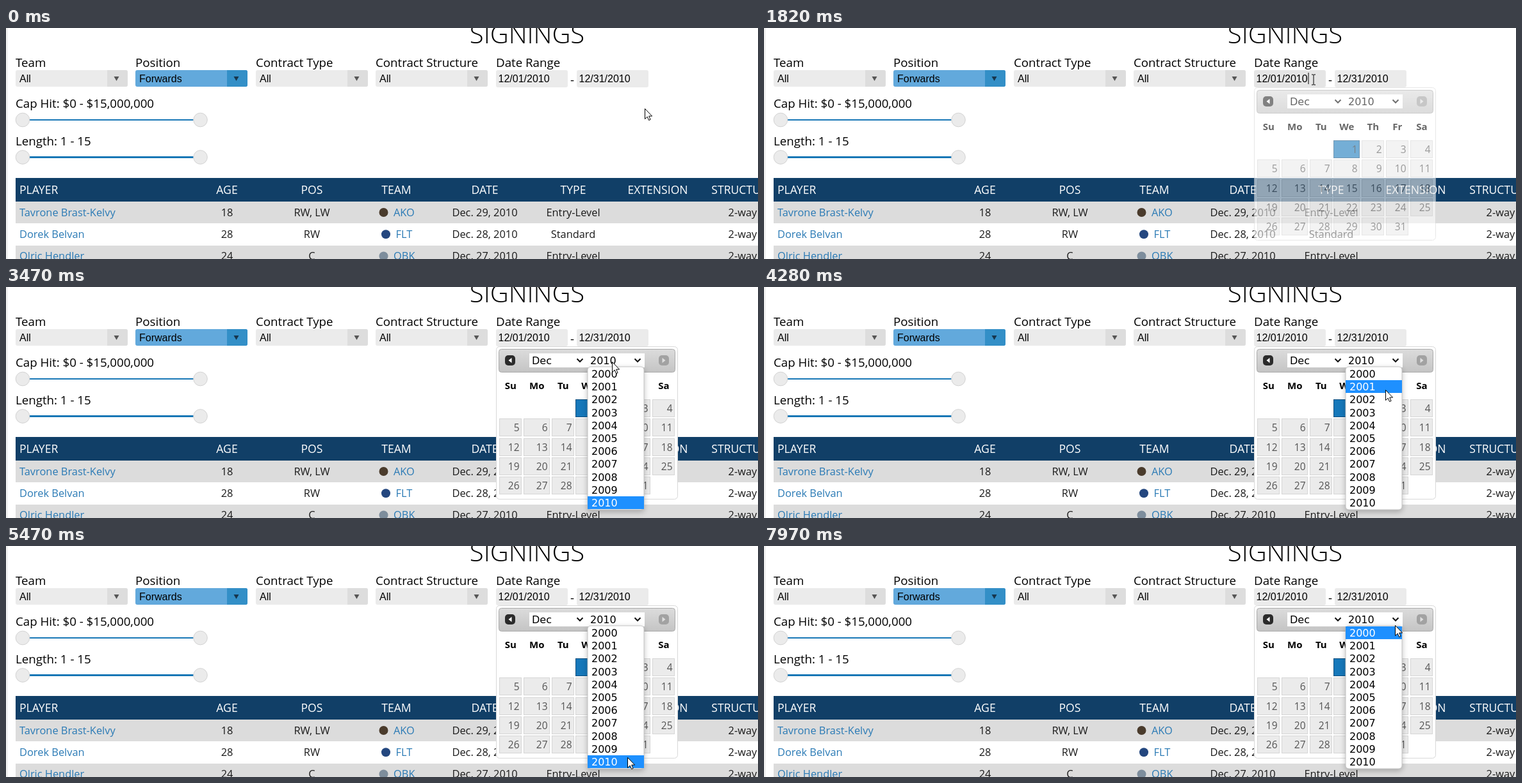
An HTML page that plays this animation: 1174 px wide and 362 px high, repeating every 8 s.

```html
<!DOCTYPE html>
<html lang="en">
<head>
<meta charset="utf-8">
<title>Signings</title>
<style>
  html, body { margin: 0; width: 100%; height: 100%; overflow: hidden; background: #fff; }
  svg { display: block; width: 1174px; height: 362px; font-family: "Open Sans", sans-serif; font-size: 16.4px; }
  text { white-space: pre; }
  .title { font-size: 40px; font-weight: 300; }
  .label { font-size: 18.72px; }
  .head { font-size: 17.6px; fill: #fff; }
  .cell { fill: #1a1a1a; }
  .link { fill: #2a7ab5; }
  .form { font-family: "Liberation Sans", Arial, sans-serif; font-size: 16px; }
  .pick { font-family: "DejaVu Sans", Verdana, sans-serif; font-size: 16px; }
  .week { font-size: 15px; font-weight: 700; }
  .day { font-size: 15.5px; fill: #555; }
  .mid { text-anchor: middle; }
  .end { text-anchor: end; }
</style>
</head>
<body>
<svg id="stage" viewBox="0 0 1174 362"></svg>
<script>
const LOOP = 8000;
const stage = document.getElementById('stage');

function add(tag, attrs, parent = stage) {
  const el = document.createElementNS('http://www.w3.org/2000/svg', tag);
  for (const k in attrs) el.setAttribute(k, attrs[k]);
  return parent.appendChild(el);
}
function text(str, x, y, cls, parent) {
  const el = add('text', { x, y, class: cls }, parent);
  el.textContent = str;
  return el;
}
function box(x, y, width, height, fill, rx = 0, parent = stage, stroke = 'none') {
  return add('rect', { x, y, width, height, fill, rx, stroke }, parent);
}
function shape(d, fill, parent, extra) {
  return add('path', { d, fill, ...extra }, parent);
}

// Filters
box(1, 0, 1, 362, '#dcdcdc');
text('SIGNINGS', 813.5, 24, 'title mid');

[['Team', 'All'], ['Position', 'Forwards'], ['Contract Type', 'All'], ['Contract Structure', 'All']]
  .forEach(([label, value], i) => {
    const x = 15 + Math.round(i * 187.4), on = i === 1;
    text(label, x, 61, 'label');
    box(x, 66, 175, 26, on ? '#62a9dc' : '#ebebeb', 3);
    shape(`M${x + 143} 66h29q3 0 3 3v20q0 3-3 3h-29z`, on ? '#338fc7' : '#dddddd');
    shape(`M${x + 153.5} 76h8l-4 7z`, on ? '#17364d' : '#555');
    text(value, x + 6, 85, 'form');
  });

text('Date Range', 765, 61, 'label');
const dateFrom = box(765, 66, 112, 27, '#ebebeb', 3);
box(891, 66, 112, 27, '#ebebeb', 3);
text('12/01/2010', 768.5, 85, 'form');
text('12/31/2010', 894.5, 85, 'form');
text('-', 881, 88, 'label');
const caret = box(849.5, 70, 1, 18, '#000');

function slider(label, y, weight) {
  text(label, 15, y - 19, 'label');
  box(26, y - weight / 2, 277, weight, '#1877b6');
  for (const cx of [26, 303.5])
    add('circle', { cx, cy: y, r: 10.8, fill: '#ebebeb', stroke: '#d3d3d3' });
}
slider('Cap Hit: $0 - $15,000,000', 144, 2);
slider('Length: 1 - 15', 202.5, 3);

// Table
const cols = [345, 477.5, 609.5, 747.5, 885.5, 1017.5, 1150];
box(15, 235, 1159, 37, '#113f67');
text('PLAYER', 21, 260, 'head');
['AGE', 'POS', 'TEAM', 'DATE', 'TYPE', 'EXTENSION', 'STRUCTURE']
  .forEach((h, i) => text(h, cols[i], 260, 'head mid'));

[
  ['Tavrone Brast-Kelvy', '18', 'RW, LW', 'AKO', 'Dec. 29, 2010', 'Entry-Level', '#4a3b2c', 605],
  ['Dorek Belvan', '28', 'RW', 'FLT', 'Dec. 28, 2010', 'Standard', '#24477f', 608.5],
  ['Olric Hendler', '24', 'C', 'OBK', 'Dec. 27, 2010', 'Entry-Level', '#7d8d9c', 605]
].forEach(([name, age, pos, team, date, type, color, teamX], i) => {
  const top = 272 + i * 34.5, y = 295 + i * 34.2;
  if (i % 2 === 0) box(15, Math.floor(top), 1159, 34, '#dcdcdc');
  text(name, 21, y, 'link');
  text(team, teamX, y, 'link');
  add('circle', { cx: teamX - 15.5, cy: y - 6, r: 7, fill: color });
  [age, pos, , date, type, , '2-way'].forEach((v, c) => text(v, cols[c], y, 'cell mid'));
});

// Calendar
const grad = add('linearGradient', { id: 'bar', x1: 0, y1: 0, x2: 0, y2: 1 }, add('defs', {}));
add('stop', { offset: 0, 'stop-color': '#dcdcdc' }, grad);
add('stop', { offset: 1, 'stop-color': '#c4c4c4' }, grad);

const calendar = add('g', {});
box(765.5, 93.5, 283, 239, '#fff', 5, calendar, '#d8d8d8');
box(769.5, 97.5, 275, 36, 'url(#bar)', 4, calendar, '#aaa');
box(779, 107, 16, 16, '#2b2b2b', 5, calendar);
shape('M789.5 111v8l-5-4z', '#fff', calendar);
box(1019, 107, 16, 16, '#a2a2a2', 5, calendar);
shape('M1024.5 111v8l5-4z', '#dedede', calendar);
box(817, 104, 180, 22, '#fff', 0, calendar);
text('Dec', 821, 121, 'pick', calendar);
text('2010', 912, 121, 'pick', calendar);
for (const x of [896, 986])
  shape(`M${x - 4.5} 112.5l4.5 4.5l4.5-4.5`, 'none', calendar, { stroke: '#111', 'stroke-width': 2 });

const left = [770, 808, 852, 889, 933, 971, 1009], right = [805, 849, 887, 930, 968, 1006, 1044];
['Su', 'Mo', 'Tu', 'We', 'Th', 'Fr', 'Sa'].forEach((d, i) =>
  text(d, (left[i] + right[i]) / 2 + 0.3, 160, 'week mid', calendar));
for (let day = 1; day <= 31; day++) {
  const slot = day + 2, c = slot % 7, r = Math.floor(slot / 7);
  const y = Math.round(176 + r * 30.3), on = day === 1;
  box(left[c] + 0.5, y + 0.5, right[c] - left[c] - 1, 27, on ? '#1678ba' : '#ebebeb', 0, calendar, on ? '#12507e' : '#d6d6d6');
  const label = text(day, right[c] - 3.5, y + 19.7, 'day end', calendar);
  if (on) label.style.fill = '#1b2d3c';
}

// Year list
const ROW = 20.2, LIST_TOP = 126;
const list = add('g', {});
list.style.filter = 'drop-shadow(0 3px 4px rgba(0,0,0,.25))';
box(908, 125, 88, 224, '#fff', 5, list, '#c4c4c4');
const mark = box(908, LIST_TOP, 88, 20, '#1e90ff', 0, list);
const years = Array.from({ length: 11 }, (_, i) =>
  text(2000 + i, 914, 142 + i * ROW, 'pick', list));

// Pointer
const arrow = shape('M.5.5V16.6L4.2 13.1L6.6 18.6L9.1 17.5L6.7 12.1H11.6z', '#fff', stage,
  { stroke: '#000', 'stroke-linejoin': 'round' });
const beam = shape('M-3-8h2.5l.5.5l.5-.5h2.5M0-7.5v15M-3 8h2.5l.5-.5l.5.5h2.5', 'none', stage, { stroke: '#000' });

// time, x, y, eased towards the next point
const path = [
  [0, 997, 126], [660, 997, 126, 1], [1220, 869, 92], [1420, 858, 81],
  [2290, 858, 81, 1], [2920, 940, 116], [3050, 946, 117],
  [4010, 946, 117], [4280, 970, 161], [4770, 972, 249], [5470, 970, 331],
  [7190, 970, 331, 1], [7970, 985, 124], [LOOP, 985, 124]
];
const STEP = 68;
const clamp = (v, a, b) => Math.min(b, Math.max(a, v));
const ramp = (t, from, to) => clamp((t - from) / (to - from), 0, 1);

function pointer(t) {
  let i = 0;
  while (i < path.length - 2 && t >= path[i + 1][0]) i++;
  const [t0, x0, y0, eased] = path[i], [t1, x1, y1] = path[i + 1];
  const steps = Math.max(1, Math.round((t1 - t0) / STEP));
  let p = Math.floor((t - t0) / (t1 - t0) * steps + 1e-6) / steps;
  if (eased) p = p * p * (3 - 2 * p);
  return [x0 + (x1 - x0) * p, y0 + (y1 - y0) * p];
}

function show(el, on) {
  el.style.display = on ? '' : 'none';
}

function draw(t) {
  const [x, y] = pointer(t);
  const typing = y < 91;
  show(beam, typing);
  show(arrow, !typing);
  (typing ? beam : arrow).setAttribute('transform', `translate(${Math.round(x)} ${Math.round(y)})`);

  const focus = ramp(t, 1690, 1960) - ramp(t, 3120, 3400);
  const tone = Math.round(235 - 13 * focus);
  dateFrom.setAttribute('fill', `rgb(${tone},${tone},${tone})`);
  show(caret, t >= 1790 && t < 3120 && (t - 1790) % 1000 < 500);

  show(calendar, t >= 1690);
  calendar.style.opacity = ramp(t, 1620, 1960);

  show(list, t >= 3190);
  list.style.opacity = ramp(t, 3120, 3400);
  const row = t < 5000 && y < LIST_TOP ? 10 : clamp(Math.floor((y - LIST_TOP) / ROW), 0, 10);
  mark.setAttribute('y', Math.round(LIST_TOP + row * ROW));
  years.forEach((el, i) => { el.style.fill = i === row ? '#fff' : '#000'; });
}

const start = performance.now();
function tick() {
  draw((performance.now() - start) % LOOP);
  requestAnimationFrame(tick);
}
tick();
</script>
</body>
</html>
```
